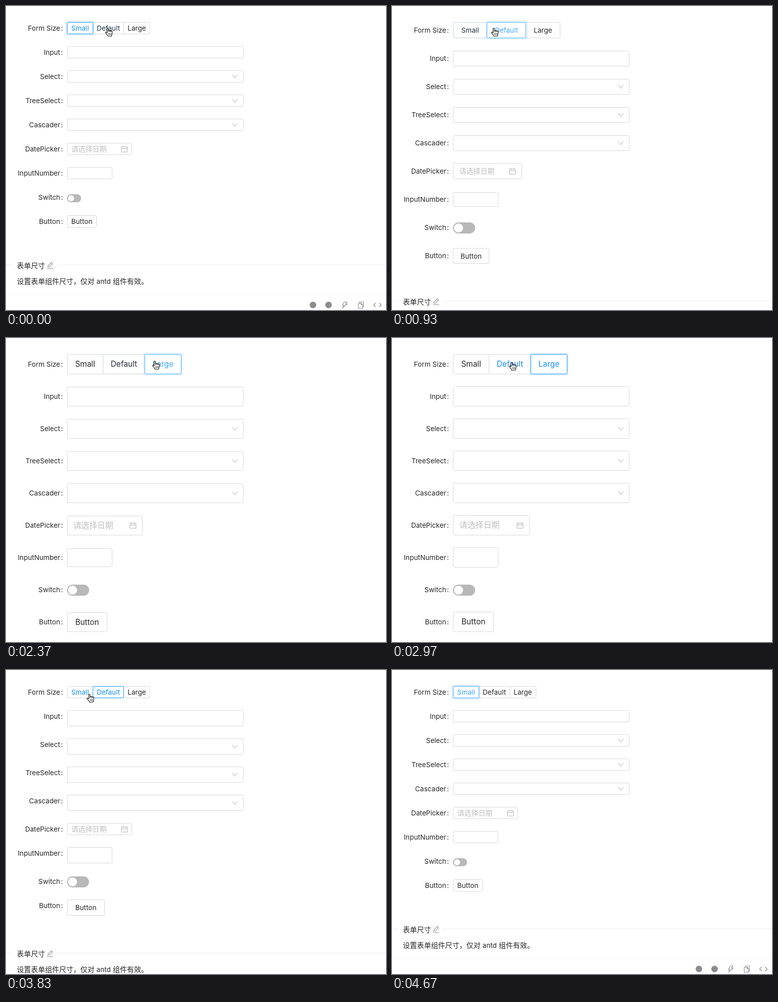
An HTML page with a canvas for the animation above (4910 ms loop, 754 by 604 pixels).

```html
<!DOCTYPE html>
<html lang="zh-CN">
<head>
<meta charset="utf-8">
<title>Form size</title>
<style>
  html, body { margin: 0; width: 100%; height: 100%; overflow: hidden; background: #fff; }
  canvas { display: block; }
</style>
</head>
<body>
<canvas id="stage" width="754" height="604"></canvas>
<script>
const ctx = document.getElementById('stage').getContext('2d');
const LOOP = 4910, LEFT = 121, GAP = 24;
const INK = [38, 38, 38], EDGE = [217, 217, 217], BLUE = [24, 144, 255], LIGHT = [64, 169, 255];
const FAINT = '#bfbfbf', ICON = '#8c8c8c';

// Values per size: small, default, large
const HEIGHT = [24, 32, 40];
const DIVIDERS = [[121, 172, 233, 285], [121, 188, 265, 333], [121, 192, 275, 347]];
const NAMES = ['Small', 'Default', 'Large'];

// time, chosen size, hovered size
const EVENTS = [
  [-40, 0, 1], [740, 1, 1], [1860, 1, 2], [2170, 2, 2], [2750, 2, 1],
  [3080, 1, 1], [3550, 1, 0], [3825, 0, 0], [4620, 0, -1]
];
// time, x, y of the pointer
const POINTER = [
  [0, 204.5, 52], [1370, 204.5, 52], [1700, 239, 49], [1890, 298, 54], [2500, 298, 54], [2960, 240, 56],
  [3300, 240, 56], [3620, 168, 56], [4000, 168, 56], [4280, 150, 33], [4560, 129, 50]
];

const clamp = v => Math.min(1, Math.max(0, v));
const lerp = (a, b, p) => a + (b - a) * p;
const mix = (a, b, p) => a.map((v, i) => lerp(v, b[i], p));
const rgb = c => `rgb(${c.map(Math.round)})`;

function bezier(x1, y1, x2, y2) {
  const at = (a, b, s) => 3 * a * s * (1 - s) ** 2 + 3 * b * s * s * (1 - s) + s ** 3;
  return v => {
    if (v <= 0 || v >= 1) return clamp(v);
    let lo = 0, hi = 1;
    for (let i = 0; i < 20; i++) {
      const mid = (lo + hi) / 2;
      if (at(x1, x2, mid) < v) lo = mid; else hi = mid;
    }
    return at(y1, y2, lo);
  };
}
const ease = bezier(.25, .1, .25, 1);
const inOut = bezier(.645, .045, .355, 1);

function text(str, x, y, size = 13.6, color = rgb(INK), align = 'left', weight = 400) {
  ctx.font = `${weight} ${size}px Inter, "Noto Sans CJK SC", sans-serif`;
  ctx.textAlign = align;
  ctx.fillStyle = color;
  ctx.fillText(str, x, y + 5);
}

function box(x, y, w, h, color = rgb(EDGE)) {
  ctx.beginPath();
  ctx.roundRect(x + .5, y + .5, w - 1, h - 1, 2);
  ctx.strokeStyle = color;
  ctx.lineWidth = 1;
  ctx.stroke();
}

function icon(d, x, y, color, width = 1.1) {
  ctx.save();
  ctx.translate(x, y);
  ctx.strokeStyle = color;
  ctx.lineWidth = width;
  ctx.stroke(new Path2D(d));
  ctx.restore();
}

function disc(x, y, r, color) {
  ctx.beginPath();
  ctx.arc(x, y, r, 0, 7);
  ctx.fillStyle = color;
  ctx.fill();
}

function sizeAt(t) {
  let from = 0, to = 0, start = -1000;
  for (const [time, size] of EVENTS) {
    if (time <= t && size !== to) { from = to; to = size; start = time; }
  }
  const age = t - start;
  const tween = (values, curve, ms = 300) => lerp(values[from], values[to], curve(clamp(age / ms)));
  return { to, tween };
}

function radioLook(i, t) {
  let ink = INK, edge = EDGE, on = i ? 0 : 1;
  if (on) ink = edge = BLUE;
  EVENTS.forEach(([time, size, hover], k) => {
    if (time > t) return;
    const end = k + 1 < EVENTS.length ? EVENTS[k + 1][0] : LOOP;
    const p = ease(clamp((Math.min(t, end) - time) / 300));
    const chosen = size === i, over = hover === i;
    const active = chosen && over ? LIGHT : BLUE;
    ink = mix(ink, chosen || over ? active : INK, p);
    edge = mix(edge, chosen ? active : EDGE, p);
    on = lerp(on, +chosen, p);
  });
  return { i, ink, edge, on };
}

function radios(t, size) {
  const xs = DIVIDERS[size], h = HEIGHT[size], font = size === 2 ? 15.5 : 13.6;
  const looks = [0, 1, 2].map(i => radioLook(i, t)).sort((a, b) => a.on - b.on);
  for (const { i, ink, edge, on } of looks) {
    const x = xs[i], w = xs[i + 1] - x + 1;
    if (i === size) {
      ctx.beginPath();
      ctx.roundRect(x - 3, 29, w + 6, h + 6, 4);
      ctx.roundRect(x, 32, w, h, 2);
      ctx.fillStyle = `rgba(24,144,255,${.12 * on})`;
      ctx.fill('evenodd');
    }
    box(x, 32, w, h, rgb(edge));
    text(NAMES[i], x + w / 2, 32 + h / 2, font, rgb(ink), 'center');
  }
}

function picker(y, h, { to, tween }) {
  const w = Math.round((to ? 137 : 129) + tween([0, 0, 15], inOut));
  const mid = y + h / 2;
  box(LEFT, y, w, h);
  text('请选择日期', to ? 133.5 : 129.5, mid, tween([14, 14, 16], ease), FAINT);
  icon('M-6-4.5H6V5.5H-6zM-6-1H6M-3-6.5V-3M3-6.5V-3', LEFT + w - (to ? 19 : 15), Math.floor(mid) + .5, '#b3b3b3', 1);
}

function toggle(y, min, { tween }) {
  const w = tween([28, 44, 44], ease, 200), h = tween([16, 22, 22], ease, 200);
  const mid = y + min / 2 + 1 + (22 - h) / 6;
  ctx.beginPath();
  ctx.roundRect(LEFT, mid - h / 2, w, h, h / 2);
  ctx.fillStyle = '#b8b8b8';
  ctx.fill();
  disc(LEFT + h / 2, mid, h / 2 - 2, '#fff');
}

function footer(y) {
  ctx.fillStyle = '#ececec';
  ctx.fillRect(0, y, 13, 1);
  ctx.fillRect(100, y, 654, 1);
  text('表单尺寸', 21.5, y + 2, 14, rgb(INK), 'left', 500);
  icon('M-5.5 6H6.5M-4 3.2L-3.3.2L3-6L5.4-3.6L-.9 2.6z', 87, y + 1.5, ICON);
  text('设置表单组件尺寸，仅对', 21.5, y + 33, 14);
  text('antd', 179.5, y + 33);
  text('组件有效。', 212, y + 33, 14);

  ctx.setLineDash([3, 2]);
  icon('M0 .5H754', 0, y + 59, '#f0f0f0', 1);
  ctx.setLineDash([]);
  const mid = y + 80;
  disc(609, mid, 6.5, ICON);
  disc(640, mid, 6.5, ICON);
  icon('M-1-6H4.5L1.5-2H5L-4 6L-1.8.8H-4.5z', 672, mid, ICON);
  icon('M-5-3.5H1L3.5-1V6.5H-5zM.5-3.5V-.5H3.5M-2.5-3.5V-6H5.5V4H3.5', 704, mid, ICON);
  icon('M-3.5-4L-7.5 0L-3.5 4M3.5-4L7.5 0L3.5 4', 737, mid, ICON, 1.3);
}

function pointer(t) {
  let [, x, y] = POINTER[POINTER.length - 1];
  const k = POINTER.findIndex(p => p[0] > t);
  if (k > 0) {
    const [t0, x0, y0] = POINTER[k - 1], [t1, x1, y1] = POINTER[k];
    const u = (t - t0) / (t1 - t0), p = u * u * (3 - 2 * u);
    x = lerp(x0, x1, p);
    y = lerp(y0, y1, p);
  }
  ctx.globalAlpha = clamp((4670 - t) / 100);
  ctx.save();
  ctx.translate(x, y);
  ctx.lineJoin = 'round';
  ctx.fillStyle = '#fff';
  ctx.strokeStyle = '#111';
  ctx.lineWidth = 1.1;
  const hand = new Path2D('M-4 1.5V-6.7a1.3 1.3 0 0 1 2.6 0V-2.5a1.3 1.3 0 0 1 2.6.2a1.3 1.3 0 0 1 2.5.5' +
    'a1.2 1.2 0 0 1 2.4.6V2.5q0 2-1 3.5L4.8 8H-2.2q-.6-1.8-2-3.3L-6.7 2q-1-1.4 0-2q1.3-.6 2.7 1.5z');
  ctx.fill(hand);
  ctx.stroke(hand);
  ctx.lineWidth = .9;
  ctx.stroke(new Path2D('M-.8 2V5.5M1.4 2V5.5M3.6 2V5.5M-1.4-2.5V0M1.2-2V0M3.7-1.5V0'));
  ctx.restore();
  ctx.globalAlpha = 1;
}

function draw(t) {
  ctx.fillStyle = '#fff';
  ctx.fillRect(0, 0, 754, 604);
  const state = sizeAt(t), { to, tween } = state, min = HEIGHT[to];
  let top = 32;

  // A row is at least as tall as the chosen size; its control is centred in it.
  function row(label, height, control) {
    const rowHeight = Math.max(min, height), y = top + (rowHeight - height) / 2;
    const y0 = Math.ceil(y - .001), y1 = Math.ceil(y + height - .001);
    const mid = Math.round(top + min / 2);
    text(label, 107.5, mid, 13.6, rgb(INK), 'right');
    text(':', 109, mid);
    control(y0, y1 - y0);
    top += rowHeight + GAP;
  }
  const field = width => (y, h) => box(LEFT, y, width, h);
  const select = (y, h) => {
    box(LEFT, y, 350, h);
    icon('M-4.8-3.3L0 3L4.8-3.3', 454, y + h / 2, FAINT);
  };
  const selectHeight = tween(HEIGHT, inOut);

  row('Form Size', min, () => radios(t, to));
  row('Input', tween(HEIGHT, ease), field(350));
  for (const label of ['Select', 'TreeSelect', 'Cascader']) row(label, selectHeight, select);
  row('DatePicker', Math.floor([2, 10, 15][to] + tween([22, 22, 25], ease)), (y, h) => picker(y, h, state));
  row('InputNumber', tween(HEIGHT, v => v), field(90));
  row('Switch', min, y => toggle(y, min, state));
  row('Button', selectHeight, (y, h) => {
    const w = Math.round(tween([59, 75, 81], inOut));
    box(LEFT, y, w, h);
    text('Button', LEFT + w / 2, y + h / 2, tween([13.6, 13.6, 15.5], inOut), rgb(INK), 'center');
  });
  footer(Math.ceil(top - GAP + 74 - .001));
  pointer(t);
}

function frame() {
  draw(performance.now() % LOOP);
  requestAnimationFrame(frame);
}
frame();
</script>
</body>
</html>
```
